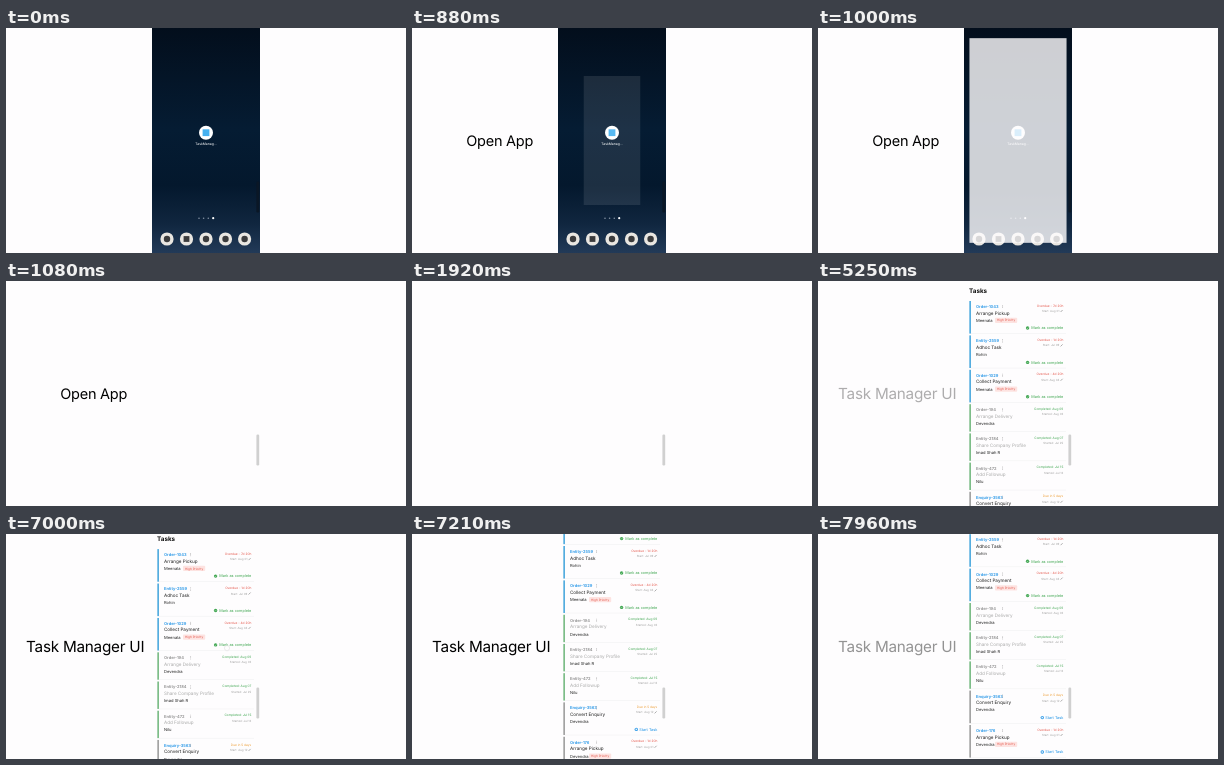
Recreate the animation shown at these times as an HTML page. Size 400x225 px, loop 8 s.

```html
<!DOCTYPE html>
<html lang="en">
<head>
<meta charset="utf-8">
<title>Task Manager UI</title>
<style>
  html, body { margin: 0; width: 100%; height: 100%; overflow: hidden; background: #fefdfe; }
  svg { display: block; width: 100vw; height: 100vh; }
  text { font-family: Inter, "Open Sans", sans-serif; text-rendering: geometricPrecision; }
  .end { text-anchor: end; }
  .mid { text-anchor: middle; }
  .caption { letter-spacing: -.25px; }
  .anim { animation: 8s linear infinite both; }

  #open { animation-name: open; }
  #title { animation-name: title; }
  #home { animation-name: home; }
  #app { animation-name: launch; transform-origin: 200px 112.5px; }
  #list { animation-name: show; }
  #scroll { animation-name: scroll; }
  #touch { animation-name: touch; }
  #handle { animation-name: handle; }

  @keyframes open {
    0%, .4% { opacity: 0; }
    3.6%, 20.4% { opacity: 1; }
    23.8%, 100% { opacity: 0; }
  }
  @keyframes title {
    0%, 64.6% { opacity: 0; }
    67.9%, 97.8% { opacity: 1; }
    100% { opacity: .25; }
  }
  @keyframes home {
    0%, 13.49% { visibility: visible; }
    13.5%, 100% { visibility: hidden; }
  }
  @keyframes launch {
    0%, 10.4% { opacity: 0; transform: scale(.47, .52); }
    11% { opacity: .09; transform: scale(.52, .57); animation-timing-function: ease-out; }
    13.5%, 100% { opacity: 1; transform: none; }
  }
  @keyframes show {
    0%, 53.7% { opacity: 0; }
    57.8%, 100% { opacity: 1; }
  }
  @keyframes scroll {
    0%, 86% { transform: none; animation-timing-function: cubic-bezier(.5, 0, .4, 1); }
    92.75%, 100% { transform: translateY(-54.2px); }
  }
  @keyframes touch {
    0%, 86% { opacity: 0; }
    86.5%, 89% { opacity: 1; }
    90%, 100% { opacity: 0; }
  }
  @keyframes handle {
    0%, 12.5% { fill: #0a1726; }
    13.5%, 100% { fill: #d0d0d0; }
  }
</style>
</head>
<body>
<svg viewBox="0 0 400 225">
  <defs>
    <linearGradient id="sky" x2="0" y2="1">
      <stop offset="0" stop-color="#030e1c"/>
      <stop offset=".45" stop-color="#051c33"/>
      <stop offset=".7" stop-color="#04182d"/>
      <stop offset=".87" stop-color="#10263f"/>
      <stop offset="1" stop-color="#223a58"/>
    </linearGradient>
    <clipPath id="screen"><rect x="146" width="108" height="225"/></clipPath>
  </defs>
  <g clip-path="url(#screen)">
    <g id="home" class="anim">
      <rect x="146" width="108" height="225" fill="url(#sky)"/>
      <circle cx="200" cy="104.7" r="7" fill="#fff"/>
      <rect x="196.6" y="101.3" width="6.8" height="6.8" fill="#45b1f0"/>
      <text class="mid" x="200" y="117" font-size="3.4" fill="#fff">TaskManag...</text>
      <g id="dock"></g>
    </g>
    <rect id="app" class="anim" x="146" width="108" height="225" fill="#fefdfe"/>
    <g id="list" class="anim"><g id="scroll" class="anim"></g></g>
    <rect id="handle" class="anim" x="250.4" y="153.5" width="2.8" height="31" rx="1.2"/>
  </g>
  <text id="open" class="anim mid caption" x="87.7" y="117.6" font-size="14.5">Open App</text>
  <text id="title" class="anim mid caption" x="79.2" y="117.8" font-size="15.3">Task Manager UI</text>
</svg>
<script>
  const BLUE = '#1f93e6', GREEN = '#3fa650', RED = '#e4574c', ORANGE = '#eda03c';

  const label = (x, y, size, fill, str, extra = '') =>
    `<text x="${x}" y="${y + size * .36}" font-size="${size}" fill="${fill}" ${extra}>${str}</text>`;
  const right = (y, size, fill, str, x = 245.3) => label(x, y, size, fill, str, 'class="end"');

  // kind, id, title, person, high priority, due, start
  const tasks = [
    ['open', 'Order-1043', 'Arrange Pickup', 'Meenala', 1, 'Overdue - 7d 20h', 'Start: Aug 01'],
    ['open', 'Entity-2559', 'Adhoc Task', 'Rohin', 0, 'Overdue - 1d 20h', 'Start: Jul 09'],
    ['open', 'Order-1029', 'Collect Payment', 'Meenala', 1, 'Overdue - 4d 20h', 'Start: Aug 04'],
    ['done', 'Order-194', 'Arrange Delivery', 'Devendra', 0, 'Completed: Aug 09', 'Started: Aug 02'],
    ['done', 'Entity-2184', 'Share Company Profile', 'Imad Shah R', 0, 'Completed: Aug 07', 'Started: Jul 25'],
    ['done', 'Entity-472', 'Add Followup', 'Nilu', 0, 'Completed: Jul 15', 'Started: Jul 12'],
    ['new', 'Enquiry-3563', 'Convert Enquiry', 'Devendra', 0, 'Due in 5 days', 'Start: Aug 12'],
    ['new', 'Order-176', 'Arrange Pickup', 'Devendra', 1, 'Overdue - 1d 20h', 'Start: Aug 01'],
  ];
  const bars = { open: '#55addf', done: '#7dbd88', new: '#a3a3a3' };

  function action(kind, y) {
    const start = kind === 'new';
    const color = start ? BLUE : GREEN, x = start ? 224.3 : 209.6;
    const mark = start ? `M${x - .5} ${y - .8}l1.4 .8l-1.4 .8z` : `M${x - .8} ${y}l.6 .6l1.1 -1.2`;
    return `<circle cx="${x}" cy="${y}" r="1.7" fill="${color}"/>
      <path d="${mark}" fill="${start ? '#fff' : 'none'}" stroke="#fff" stroke-width=".4"/>` +
      right(y, 3.8, color, start ? 'Start Task' : 'Mark as complete');
  }

  const rowHeight = kind => kind === 'done' ? 29.2 : 34.4;

  function row([kind, id, title, person, high, due, start], rowY) {
    const done = kind === 'done', h = rowHeight(kind), y = rowY + 5.5;
    const dueColor = done ? GREEN : due.startsWith('Due') ? ORANGE : RED;
    let out = `<rect x="151.3" y="${rowY}" width="1.7" height="${h - 1.8}" fill="${bars[kind]}"/>
      <rect x="153" y="${rowY + h - 2}" width="95" height=".5" fill="#efeff1"/>`;
    out += label(158, y, 4.05, done ? '#8c8c8c' : BLUE, id, 'font-weight="600"');
    out += [-1.2, 0, 1.2].map(d => `<circle cx="184.7" cy="${y + d}" r=".35" fill="#777"/>`).join('');
    out += label(158, y + 6.4, 4.6, done ? '#a9a9a9' : '#1b1b1b', title);
    out += label(158, y + 13.8, 4.1, '#222', person);
    if (high) {
      out += `<rect x="177" y="${y + 11.2}" width="22.2" height="5.2" rx="1" fill="#fde3e1"/>` +
        label(188.1, y + 13.8, 3.1, RED, 'High Priority', 'class="mid"');
    }
    out += right(y - 1, 3.2, dueColor, due);
    out += right(y + 4.5, 2.9, '#a2a2a2', start, done ? 245.3 : 241.4);
    if (!done) {
      out += `<path d="M242.6 ${y + 5.5}l2 -2" stroke="#888" stroke-width=".7"/>` + action(kind, y + 21.5);
    }
    return out;
  }

  let html = label(151, 9.8, 6.3, '#111', 'Tasks', 'font-weight="700"');
  let rowY = 20;
  for (const task of tasks) {
    html += row(task, rowY);
    rowY += rowHeight(task[0]);
  }
  html += '<circle id="touch" class="anim" cx="221" cy="119" r="2.6" fill="none" stroke="#ddd" stroke-width=".6"/>';
  document.getElementById('scroll').innerHTML = html;

  const pages = [193, 197.6, 202.3, 207.2].map((x, i) =>
    `<circle cx="${x}" cy="190.2" r="${i === 3 ? 1.1 : .8}" fill="${i === 3 ? '#fff' : '#8492a3'}"/>`);
  const icons = [161, 180.5, 200, 219.5, 238.6].map((x, i) =>
    `<circle cx="${x}" cy="211" r="6.6" fill="#e9e6e1"/>` + (i === 1
      ? `<rect x="${x - 2.9}" y="208.1" width="5.8" height="5.8" fill="#3b3b3c"/>`
      : `<circle cx="${x}" cy="211" r="3.2" fill="#3b3b3c"/>`));
  document.getElementById('dock').innerHTML = pages.concat(icons).join('');
</script>
</body>
</html>
```
